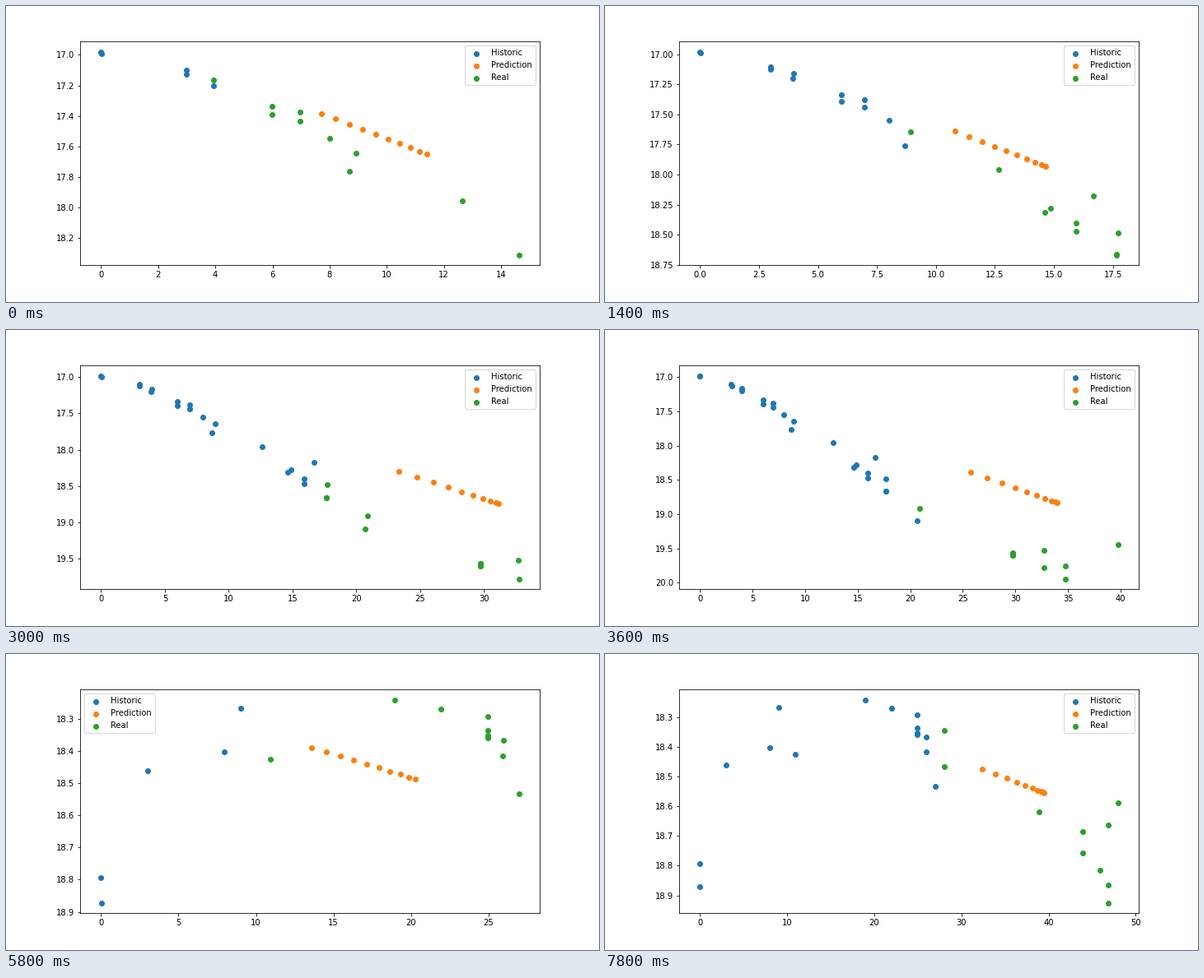
A matplotlib script that plays this animation: 720 px wide and 360 px high, repeating every 8 s.

```python
import numpy as np
import matplotlib.pyplot as plt
from matplotlib.animation import FuncAnimation

FRAMES, INTERVAL = 40, 200
SWITCH = 29   # frame where the second light curve begins
WINDOW = 5    # shortest history, and the span the forecast looks at
AHEAD = 10    # points shown beyond the history
REVISIT = 0.01  # days between two exposures of one night

# Nights: day, magnitude, and the change seen by a second exposure, if any
FADING = [
    (0, 16.979, .011), (2.98, 17.102, .023), (3.94, 17.204, -.041),
    (5.98, 17.338, .055), (6.96, 17.437, -.06), (8, 17.549), (8.69, 17.762),
    (8.93, 17.646), (12.65, 17.96), (14.62, 18.312), (14.86, 18.278),
    (15.93, 18.402, .067), (16.67, 18.176), (17.66, 18.66, .007),
    (17.71, 18.483), (20.69, 19.094), (20.87, 18.914), (29.71, 19.565, .041),
    (29.71, 19.575, .025), (32.71, 19.53, .252), (34.74, 19.758, .188),
    (39.74, 19.446), (51.78, 19.855, .245), (51.78, 20.4, -.59),
    (56.79, 20.015), (58.8, 20.05, .15), (61.8, 19.9, .2), (63.7, 20.25)]
PEAKING = [
    (0, 18.793, .079), (3, 18.461), (7.96, 18.402), (9.02, 18.267),
    (10.94, 18.426), (18.96, 18.241), (21.95, 18.269), (24.95, 18.293, .043),
    (24.95, 18.353, .006), (25.94, 18.416, -.05), (26.96, 18.533),
    (27.99, 18.344, .122), (38.9, 18.62), (43.9, 18.684, .072),
    (45.9, 18.814), (46.83, 18.662, .202), (46.83, 18.925), (47.94, 18.587)]

# Forecast ends by mean day of the window: mean, x0, x1, y0, y1
FADING_ENDS = [
    (2, 7.72, 11.41, 17.384, 17.65), (7.3, 10.78, 14.61, 17.638, 17.931),
    (12, 17.85, 24.58, 18.075, 18.543), (18, 25.66, 33.89, 18.39, 18.834),
    (28, 37.46, 48.2, 18.607, 19.022), (35, 45, 56, 18.74, 19.15)]
PEAKING_ENDS = [
    (4, 13.58, 20.28, 18.389, 18.487), (25.7, 32.4, 39.47, 18.474, 18.554)]


def expose(nights):
    """List every exposure as (day, magnitude)."""
    points = []
    for day, mag, *change in nights:
        points.append((day, mag))
        points += [(day + REVISIT, mag + c) for c in change]
    return np.array(points)


def forecast(history, ends):
    """Ease out along a straight line, more strongly at later days."""
    mean = history[-WINDOW:, 0].mean()
    knots, *cols = np.transpose(ends)
    x0, x1, y0, y1 = (np.interp(mean, knots, col) for col in cols)
    ease = 1 - (1 - np.linspace(0, 1, AHEAD)) ** (1.15 + 0.034 * mean)
    return x0 + (x1 - x0) * ease, y0 + (y1 - y0) * ease


CURVES = [(expose(FADING), FADING_ENDS), (expose(PEAKING), PEAKING_ENDS)]


def draw(frame):
    curve, step = divmod(frame, SWITCH)
    data, ends = CURVES[curve]
    n = WINDOW + step
    history, real = data[:n], data[n:n + AHEAD]
    ax.clear()
    ax.scatter(*history.T, label="Historic")
    ax.scatter(*forecast(history, ends), label="Prediction")
    ax.scatter(*real.T, label="Real")
    ax.invert_yaxis()
    ax.legend()


fig, ax = plt.subplots(figsize=(10, 5), dpi=72)
fig.subplots_adjust(bottom=0.125)
anim = FuncAnimation(fig, draw, frames=FRAMES, interval=INTERVAL,
                     init_func=lambda: draw(0), repeat=True, repeat_delay=0)
plt.show()
```
